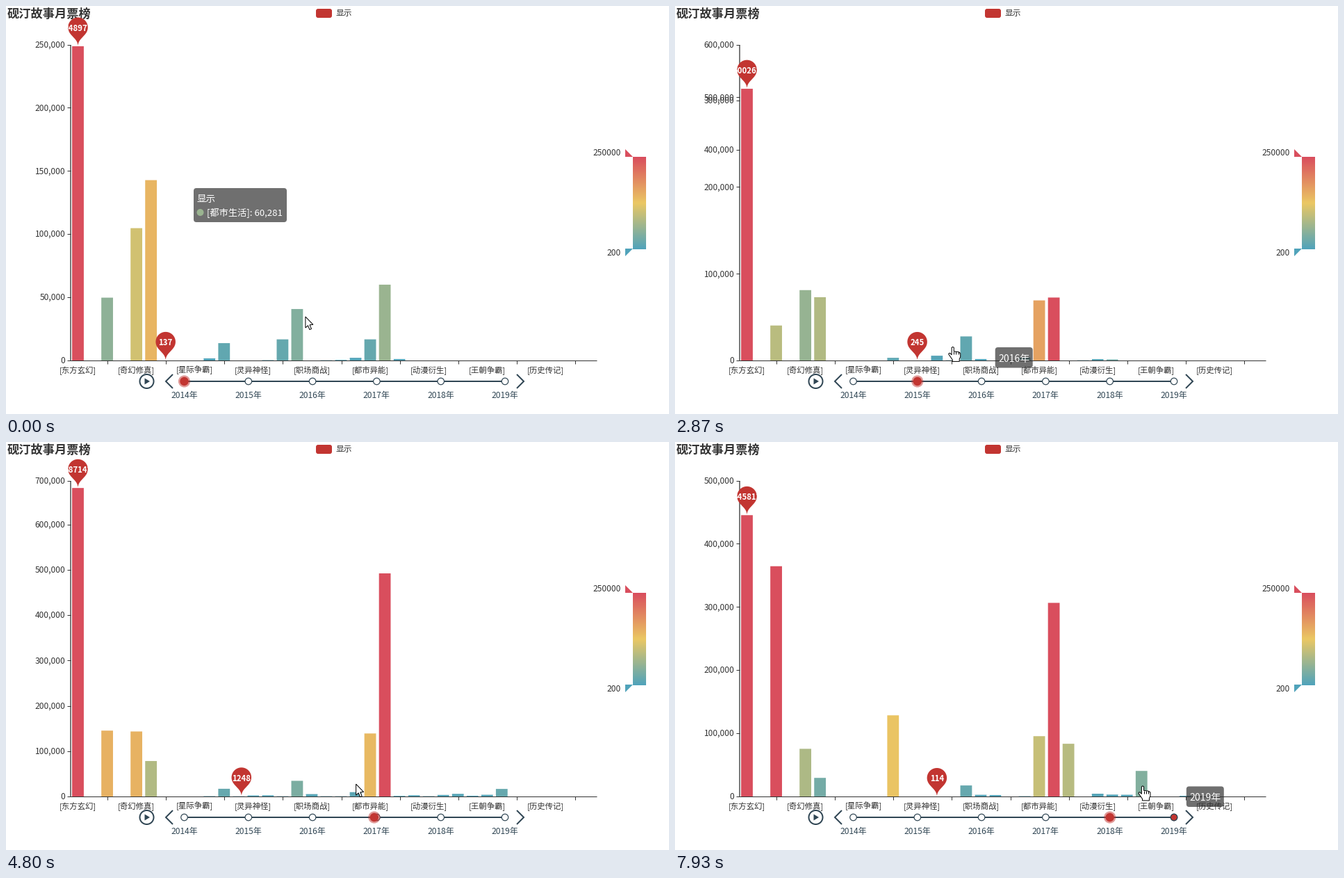
Recreate the animation shown at these times as a matplotlib script. Size 954 by 587 pixels, loop 8 s.

```python
import random
import numpy as np
import matplotlib.pyplot as plt
from matplotlib.animation import FuncAnimation
from matplotlib.colors import LinearSegmentedColormap
from matplotlib.patches import Circle, FancyBboxPatch, PathPatch, Polygon, Rectangle
from matplotlib.path import Path

W, H = 954, 587
LOOP, FRAMES = 8000, 120
STEP = LOOP / FRAMES
INK, SLATE, RED = "#333333", "#304654", "#c23531"
X0, X1, TOP, BASE = 93, 850, 56, 510.5
SLOT = (X1 - X0) / 36
PIN = 0.95                      # marker scale
TRANSITION = 300
CLICKS = [920, 2857, 4590, 6650]

plt.rcParams["font.family"] = ["Noto Sans CJK JP", "DejaVu Sans"]
heat = LinearSegmentedColormap.from_list("heat", ["#50a3ba", "#eac763", "#d94e5d"])

LABELS = ["东方玄幻", "奇幻修真", "星际争霸", "灵异神怪", "职场商战",
          "都市异能", "动漫衍生", "王朝争霸", "历史传记"]
MAIN = (0, 2, 4, 5, 10, 15, 20, 21)     # genres that lead every year


class Year:
    """Votes in thousands: leading genres, lowest genre, small random rest."""

    def __init__(self, k, top, lead, low_at, low, late):
        rng = random.Random(k)
        self.top, self.step = top, 50 if top < 400 else 100
        self.votes = {i: low + top * .012 * rng.random() ** 3
                      for i in range(9, 23 + 2 * k)}
        self.votes.update(zip(MAIN, lead))
        self.votes.update(late)
        self.votes[low_at] = low

    def y(self, v):
        return BASE - (BASE - TOP) * v / self.top

    def bar_y(self, i):
        return self.y(self.votes.get(i, 0))


YEARS = [
    Year(0, 250, (248.971, 50, 105, 143, 14, 41, 17, 60.281), 6, .137, {14: 17}),
    Year(1, 350, (302.431, 38, 83, 73, 3, 29, 64, 59), 11, .116, {13: 6}),
    Year(2, 600, (500.262, 86, 57, 79, 11, 14, 164, 305), 18, .245, {19: 22, 25: 28}),
    Year(3, 700, (687.142, 148, 147, 79, 18, 36, 139, 499), 11, 1.248, {19: 10, 29: 18}),
    Year(4, 500, (445.812, 365, 76, 30, 129, 18, 96, 307), 13, .114, {22: 84, 27: 41}),
]

# pointer stops: time, position counted in timeline years
STOPS = [(0, 2.34), (600, 1), (1400, 1), (1667, 1.25), (1800, 1.4), (2130, 3.05),
         (2270, 3.05), (2530, 2), (3130, 2), (3700, 3.03), (4700, 3.03), (5640, 4),
         (6620, 4), (6800, 4.1), (7450, 4.95), (7800, 4.98)]
DRIFT = [(0, 447), (600, 491), (1667, 486), (2400, 490), (LOOP, 495)]
# year hints: start, end, index
TIPS = [(600, 1450, 1), (2100, 2430, 3), (2430, 3250, 2),
        (3600, 4800, 3), (5642, 6950, 4), (7420, LOOP, 5)]

fig = plt.figure(figsize=((W + 1e-6) / 72, (H + 1e-6) / 72), dpi=72, facecolor="white")
ax = fig.add_axes([0, 0, 1, 1])
moving = []


def text(x, cy, s, size=12, color=INK, ha="center", z=3, **kw):
    return ax.text(x, cy + .37 * size, s, fontsize=size, color=color, ha=ha,
                   va="baseline", zorder=z, **kw)


def line(xs, ys, color=INK, width=1, z=2, **kw):
    return ax.plot(xs, ys, color=color, lw=width, zorder=z,
                   solid_capstyle="butt", solid_joinstyle="miter", **kw)[0]


def shape(patch, fill, z, edge="none", width=0.0, alpha=None):
    patch.set(facecolor=fill, edgecolor=edge, linewidth=width, zorder=z, alpha=alpha)
    return ax.add_patch(patch)


def round_box(x, y, w, h, r):
    return FancyBboxPatch((x, y), w, h, boxstyle=f"round,pad=0,rounding_size={r}")


def slot_x(i):
    return X0 + SLOT * (i + .5)


def year_x(i):
    return 256.5 + 92.3 * i


def pointer_x(s):
    return 308 + 91.7 * (s - 1)


def track(t, keys):
    return np.interp(t, *zip(*keys))


def value_color(v):
    return heat(np.clip((v - .2) / 249.8, 0, 1))


def mix(a, b, p):
    return a + (b - a) * p


def ease_out(u, power):
    return 1 - (1 - min(u, 1)) ** power


def in_out_quint(u):
    return 16 * u ** 5 if u < .5 else 1 - 16 * (1 - u) ** 5


def draw_static():
    text(2, 11, "砚汀故事月票榜", 17.2, ha="left", weight="bold")
    shape(round_box(446, 4, 23, 13, 3), RED, 2)
    text(474, 9.3, "显示", 11.7, ha="left")

    line([X0] * 2, [TOP, BASE + .5], width=1.3, snap=False)
    line([X0, X1], [BASE] * 2)
    for i, name in enumerate(LABELS):
        text(slot_x(4 * i), 522.5, f"[{name}]", 11.4)
        tick = int(slot_x(4 * i + 2)) + .5
        line([tick] * 2, [BASE, BASE + 5])

    ax.pcolormesh([902, 921], np.linspace(217, 350, 134),
                  np.linspace(1, 0, 133)[:, None], cmap=heat, vmin=0, vmax=1, zorder=2)
    shape(Polygon([(891, 206), (891, 217), (902, 217)]), heat(1.0), 2)
    shape(Polygon([(891, 349), (902, 349), (891, 360)]), heat(0.0), 2)
    text(885, 210.5, "250000", ha="right")
    text(885, 354.5, "200", ha="right")

    line([year_x(0), year_x(5)], [540, 540], SLATE, 2, 4)
    for i in range(6):
        shape(Circle((year_x(i), 540), 4.75), "white", 5, SLATE, 1.2)
        text(year_x(i), 560, f"{2014 + i}年", color=SLATE)
    shape(Circle((202.5, 540), 10), "none", 4, SLATE, 2)
    shape(Polygon([(199.5, 535.5), (207, 540), (199.5, 544.5)]), SLATE, 4)
    for x, tip in ((240, 230), (735, 745)):
        line([x, tip, x], [530, 540, 550], SLATE, 2, 4)


def pin_path(x, y):
    r, h = 15 * PIN, 50 * PIN
    dy = r * r / (h - r)
    cy = y - h + r + dy
    a = np.arcsin(dy / r)
    dx = r * np.cos(a)
    ox, oy = np.sin(a) * r * .6, cy + dy + np.cos(a) * r * .6
    arc = np.linspace(np.pi - a, 2 * np.pi + a, 40)
    pts = [(x + r * np.cos(q), cy + r * np.sin(q)) for q in arc]
    codes = [Path.MOVETO] + [Path.LINETO] * 39 + [Path.CURVE4] * 6
    pts += [(x + dx - ox, oy), (x, y - r * .7), (x, y),
            (x, y - r * .7), (x - dx + ox, oy), (x - dx, cy + dy)]
    return Path(pts, codes)


def draw_pin(x, y, value):
    moving.append(shape(PathPatch(pin_path(x, y)), RED, 7))
    moving.append(text(x, y - 26.3, f"{value * 1000:.0f}", 11.4, "white", z=8,
                       weight="bold"))


def draw_axis(old, new, p):
    for v in range(0, new.top + 1, new.step):
        y = new.y(v)
        if v <= old.top and v % old.step == 0:
            y = mix(old.y(v), y, p)
            add_tick(y, v)
        else:
            add_tick(y, v)


def add_tick(y, v):
    moving.append(line([X0 - 5, X0], [int(y) + .5] * 2))
    moving.append(text(85.5, y - 1, f"{v * 1000:,}", ha="right"))


def draw_bars(old, new, p):
    for i in sorted(old.votes.keys() | new.votes.keys()):
        y = mix(old.bar_y(i), new.bar_y(i), p)
        if BASE - y > .7:
            bar = Rectangle((slot_x(i) - 8.4, y), 16.8, BASE - .5 - y, snap=False)
            moving.append(shape(bar, value_color(new.votes.get(i, 0)), 1))
    for pick in (max, min):
        i, j = (pick(year.votes, key=year.votes.get) for year in (old, new))
        y = mix(old.bar_y(i), new.bar_y(j), p)
        draw_pin(mix(slot_x(i), slot_x(j), p), y, new.votes[j])


def tip_box(x, y, w, h):
    moving.append(shape(round_box(x, y, w, h, 4), "#323232", 10, alpha=.7))


def draw_tips(t):
    if t < 330:
        x, y = 270 - 10 * ease_out(t / 330, 3), 262
        tip_box(x, y, 134, 49)
        moving.append(text(x + 4, y + 15.5, "显示", 13.5, "white", "left", 11))
        moving.append(shape(Circle((x + 9.5, y + 35), 5), value_color(60.281), 11))
        moving.append(text(x + 18.5, y + 35, "[都市生活]: 60,281", 13.2, "white", "left", 11))
    last = (270, 262)
    for start, end, i in TIPS:
        goal = (pointer_x(i) + 61, track(start, DRIFT) + 1)
        if start <= t < end:
            p = ease_out((t - start) / 400, 4)
            x, y = mix(last[0], goal[0], p), mix(last[1], goal[1], p)
            tip_box(x, y, 54, 29.5)
            moving.append(text(x + 27, y + 15.5, f"{2014 + i}年", 14, "white", z=11))
            if not any(start < c <= t for c in CLICKS):
                moving.append(shape(Circle((year_x(i), 540), 4.75), RED, 5.5, SLATE, 1.2))
        last = goal


ARROW = [(0, 0), (0, 16), (3.6, 12.7), (6, 18.6), (8.6, 17.5), (6.2, 11.7), (11, 11.4)]
HAND = [(-1.6, 1), (0, 0), (1.6, 1), (1.6, 6.5), (7.5, 7.2), (10, 8.3), (11, 9.5),
        (11, 14.5), (9.5, 17.5), (9.5, 21), (-.5, 21), (-.5, 18.5), (-6, 10.5),
        (-5.5, 9.2), (-4, 9), (-1.6, 11.5)]


def draw_pointer(t):
    s, y = track(t, STOPS), track(t, DRIFT)
    x = pointer_x(s)
    hand = abs(s - round(s)) < .08 and y > 484
    outline = np.array(HAND if hand else ARROW) + (x, y)
    moving.append(shape(Polygon(outline), "white", 12, "black", 1))
    if hand:
        for dx in (1.6, 4.7, 7.8):
            moving.append(line([x + dx] * 2, [y + 7, y + 11], "black", 1, 13))


def update(n):
    while moving:
        moving.pop().remove()
    t = n * STEP
    k = sum(c <= t for c in CLICKS)
    prev = max(k - 1, 0)
    u = min((t - CLICKS[prev]) / TRANSITION, 1) if k else 1
    p = ease_out(u, 3)
    draw_axis(YEARS[prev], YEARS[k], p)
    draw_bars(YEARS[prev], YEARS[k], p)
    x = mix(year_x(prev), year_x(k), in_out_quint(u))
    moving.append(shape(Circle((x, 540), 8.6), RED, 6, alpha=.5))
    moving.append(shape(Circle((x, 540), 6.2), RED, 6))
    draw_tips(t)
    draw_pointer(t)
    return moving


draw_static()
ax.set_xlim(0, W)
ax.set_ylim(H, 0)
ax.set_autoscale_on(False)
ax.axis("off")

anim = FuncAnimation(fig, update, frames=FRAMES, init_func=lambda: update(0),
                     interval=STEP, repeat=True, repeat_delay=0, blit=False)
plt.show()
```
